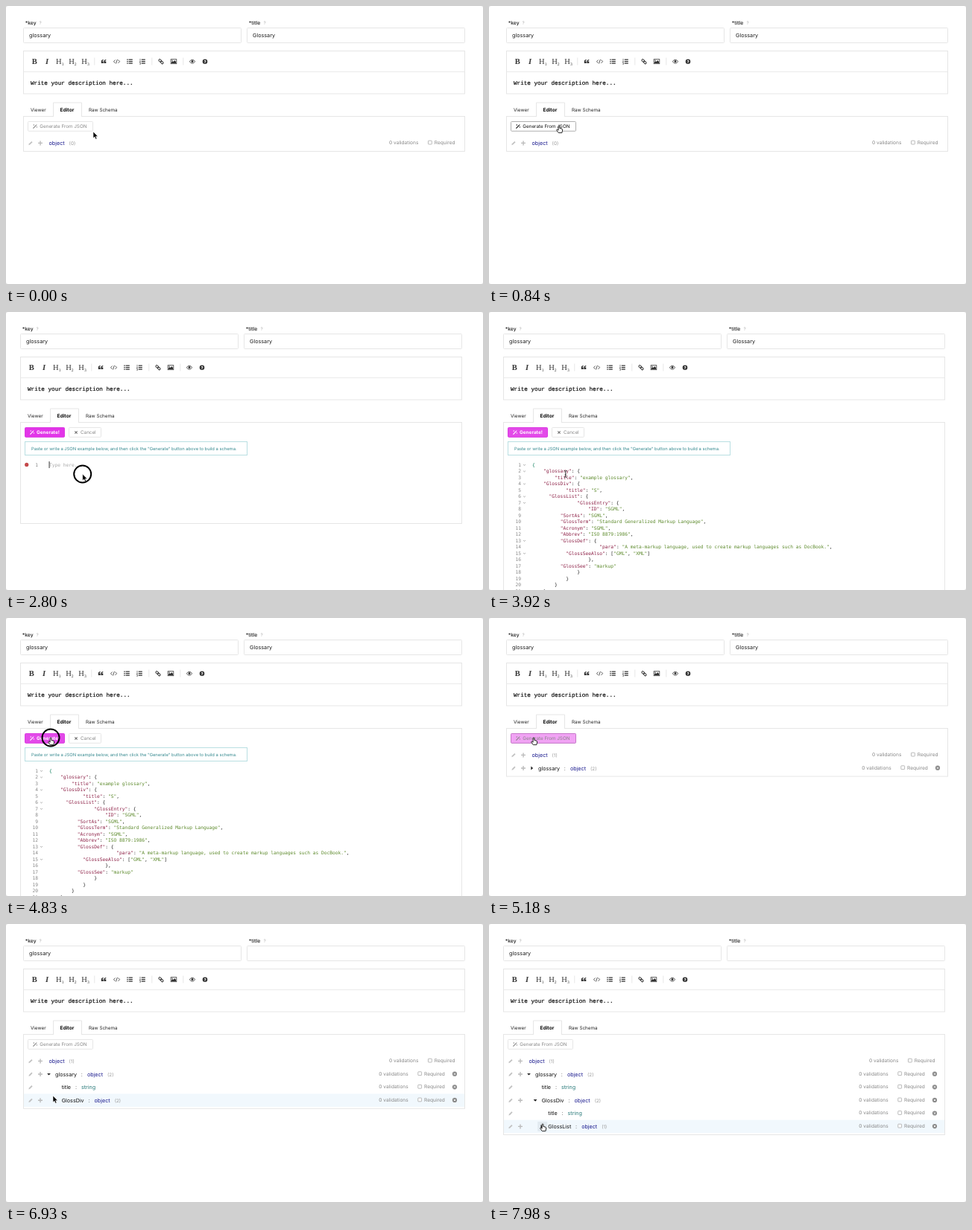
These frames come from a looping animation (640x374 px, 8 s). An HTML page:

```html
<!DOCTYPE html>
<html lang="en">
<head>
<meta charset="utf-8">
<title>Schema editor</title>
<style>
html, body { margin: 0; width: 100%; height: 100%; overflow: hidden; background: #ddd; }
svg { display: block; width: 100%; height: 100%; font-family: Inter, Roboto, sans-serif; text-rendering: geometricPrecision; }
.code { font-family: "DejaVu Sans Mono", monospace; }
.serif { font-family: "Liberation Serif", "Noto Serif", serif; }
.courier { font-family: "Liberation Mono", monospace; }
</style>
</head>
<body>
<svg id="stage" viewBox="0 0 640 374"></svg>
<script>
const stage = document.getElementById('stage');
const LOOP = 8000, STEP = 70, ROW = 17.6, INDENT = 8.6;
const OPEN = 1890, PASTE = 3080, DONE = 5040, EXPAND = 6160, EXPAND2 = 7210;
const PINK = '#e235e8', BORDER = '#e6e6e6';

// Text with its capitals centred on y
const text = (x, y, s, size = 7.2, fill = '#1a1a1a', extra = '') =>
  `<text x="${x}" y="${y + size * .36}" font-size="${size}" fill="${fill}" ${extra}>${s}</text>`;
const rect = (x, y, w, h, fill = 'none', line = 'none', extra = '') =>
  `<rect x="${x}" y="${y}" width="${w}" height="${h}" fill="${fill}" stroke="${line}" ${extra}/>`;
const path = (x, y, d, fill = 'none', line = 'none', width = 1) =>
  `<path transform="translate(${x} ${y})" d="${d}" fill="${fill}" stroke="${line}" stroke-width="${width}"/>`;
const circle = (x, y, r, fill, line = 'none', width = 1) =>
  `<circle cx="${x}" cy="${y}" r="${r}" fill="${fill}" stroke="${line}" stroke-width="${width}"/>`;
const button = (x, w, fill, line, extra = '') => rect(x, 155.5, w, 12.8, fill, line, 'rx="1" ' + extra);

// Pointer path: time, x, y
const route = [
  [0, 117, 169], [490, 94, 161], [1960, 94, 161], [2450, 102, 212], [2520, 102, 212],
  [2660, 102.7, 218], [3920, 102.7, 218], [4620, 60, 161], [5670, 60, 161], [6090, 57, 200],
  [6510, 57, 200], [6580, 58, 203], [6720, 58, 203], [6930, 63, 231], [7070, 66, 234],
  [7560, 66, 234], [7980, 72, 269]
];
const clicks = [1820, 2800, 4830, 6090, 7140];

const json = [
  [0, '{'], [4, '"glossary": {'], [8, '"title": "example glossary",'], [4, '"GlossDiv": {'],
  [12, '"title": "S",'], [6, '"GlossList": {'], [16, '"GlossEntry": {'], [20, '"ID": "SGML",'],
  [10, '"SortAs": "SGML",'], [10, '"GlossTerm": "Standard Generalized Markup Language",'],
  [10, '"Acronym": "SGML",'], [10, '"Abbrev": "ISO 8879:1986",'], [10, '"GlossDef": {'],
  [24, '"para": "A meta-markup language, used to create markup languages such as DocBook.",'],
  [12, '"GlossSeeAlso": ["GML", "XML"]'], [20, '},'], [10, '"GlossSee": "markup"'],
  [16, '}'], [12, '}'], [8, '}'], [4, '}']
];

// Schema rows: depth, name, child count (none for strings)
const schema = [[0, '', 0], [1, 'glossary', 2], [2, 'title'], [2, 'GlossDiv', 2], [3, 'title'], [3, 'GlossList', 1]];

const rowY = i => 184.4 + i * ROW;
const arrowX = depth => 57.5 + (depth - 1) * INDENT;

function pointer(t) {
  let i = 1;
  while (i < route.length - 1 && t > route[i][0]) i++;
  const [t0, x0, y0] = route[i - 1], [t1, x1, y1] = route[i];
  const p = Math.min(1, (t - t0) / (t1 - t0)), k = p * p * (3 - 2 * p);
  return [x0 + (x1 - x0) * k, y0 + (y1 - y0) * k];
}

function toolbar() {
  const ink = '#333', y = 74.7;
  let s = text(38.3, y, 'B', 10.5, ink, 'class="serif" font-weight="700" text-anchor="middle"') +
    text(55, y, 'I', 10.5, ink, 'class="serif" font-weight="700" font-style="italic" text-anchor="middle"');
  [1, 2, 3].forEach(n => s += text(50 + n * 17.1, y, `H<tspan font-size="5.6" dy="1.2">${n}</tspan>`, 10.5, ink, 'class="serif"'));
  [118.5, 195.5, 237.5].forEach(x => s += rect(x, 69.5, .7, 10, '#ddd'));
  [127.8, 131.4].forEach(x => s += path(x, y, 'M0 2.4V-.3Q0-2.7 2.9-2.8V-1.6Q1.5-1.4 1.5-.3H2.9V2.4Z', ink));
  s += path(148.5, y, 'M-2-2.2L-4 0L-2 2.2M2-2.2L4 0L2 2.2M.8-2.8L-.8 2.8', 'none', ink, .8);
  s += path(166, y, 'M-1.4-2.5H3.8M-1.4 0H3.8M-1.4 2.5H3.8M-3.8-2.5h1.5M-3.8 0h1.5M-3.8 2.5h1.5', 'none', ink, 1.3);
  s += path(183, y, 'M-1.2-2.5H3.8M-1.2 0H3.8M-1.2 2.5H3.8', 'none', ink, 1.2) +
    path(183, y, 'M-3-3.8v2.2M-3.8-.7h1.3L-3.7.9h1.3M-3.8 2h1.3v1.6h-1.3', 'none', ink, .6);
  s += `<g transform="rotate(45 208 ${y})">` + rect(204.2, y - 1.3, 4.2, 2.6, 'none', ink, 'rx="1.3"') +
    rect(207.6, y - 1.3, 4.2, 2.6, 'none', ink, 'rx="1.3"') + '</g>';
  s += rect(221.2, y - 3, 7.6, 6, 'none', ink, 'stroke-width=".8"') +
    path(225, y, 'M-3 2.2V.8L-1.5-.6L-.5.4L1.4-1.6L3 .2V2.2Z', ink) + circle(223.1, y - 1.4, .7, ink);
  s += path(250, y, 'M-3.8 0Q0-5 3.8 0Q0 5-3.8 0Z', 'none', ink, .8) + circle(250, y - .2, 1.5, ink);
  return s + circle(267, y, 3.3, ink) + text(267, y, '?', 5.4, '#fff', 'font-weight="800" text-anchor="middle"');
}

const wand = (x, color) =>
  path(x, 162, 'M-2.6 2.6L1.8-1.8', 'none', color, 1.2) +
  path(x, 162, 'M-1.7-2.8v1.6M-2.5-2h1.6M2.4.2v1.4M1.7.9h1.4M2-2.8v.8', 'none', color, .6);

function form(t) {
  let s = '';
  [[23.5, '*key', 'glossary', 46], [323.5, '*title', t < EXPAND ? 'Glossary' : '', 347]].forEach(([x, label, value, help]) => {
    s += text(x + 2.3, 23, label, 6.7, '#1a1a1a', 'font-weight="500"') +
      text(help, 23, '?', 6.2, '#aaa', 'text-anchor="middle"') +
      rect(x, 29.5, 292, 20, '#fff', BORDER, 'rx="1"') + text(x + 7.6, 39.6, value);
  });
  const blink = t >= 280 && t < 840 || t >= 1400 && t < 1680;
  if (blink) s += rect(361.8, 35, .8, 9, '#333');
  s += rect(23.5, 60.5, 592, 57.5, '#fff', BORDER) + rect(24, 88, 591, 1, '#eaeaea') + toolbar();
  return s + text(33, 103.6, 'Write your description here...', 7.65, '#000', 'class="courier" stroke="#000" stroke-width=".15"');
}

function tabs(bottom) {
  return rect(23.5, 148.5, 592, bottom - 148.5, '#fff', BORDER) +
    path(0, 0, 'M63.5 149V130H101.5V149', '#fff', BORDER) + rect(64, 147.5, 37, 2, '#fff') +
    text(33, 140, 'Viewer', 6.3, '#222') +
    text(72.4, 140, 'Editor', 6.6, '#111', 'font-weight="700"') +
    text(111, 140, 'Raw Schema', 6.3, '#222');
}

function codePanel(t, hover) {
  const mono = 'class="code"';
  let s = button(29.5, 53, hover || t >= PASTE ? '#e34ae9' : PINK, '#dc3be2') +
    wand(39, '#fff') + text(45, 162, 'Generate!', 6.4, '#fff', 'font-weight="700"') +
    button(88.5, 43, '#fff', BORDER) +
    path(98, 162, 'M-1.7-1.7L1.7 1.7M1.7-1.7L-1.7 1.7', 'none', '#777', 1.2) +
    text(104, 162, 'Cancel', 6.3, '#888') +
    rect(29.5, 174.5, 298, 18, '#fff', '#b9dfe2') +
    text(38, 183.8, 'Paste or write a JSON example below, and then click the "Generate" button above to build a schema.', 5.8, '#35898f');
  if (t < PASTE) {
    return s + circle(31.7, 205.4, 2.6, '#c4494b') + text(47, 205.4, '1', 6.25, '#888', mono + ' text-anchor="end"') +
      text(62, 205.4, 'Type here...', 6.25, '#aaa', mono) + rect(61.6, 201, .9, 9, '#222');
  }
  json.forEach(([indent, line], i) => {
    const y = 205.4 + i * 8.5;
    const colored = line.replace(/("[^"]+")(:?)/g, (m, str, colon) =>
      `<tspan fill="${colon ? '#8c1f45' : '#5d8a2c'}">${str}</tspan>${colon}`);
    s += text(47, y, i + 1, 6.25, '#888', mono + ' text-anchor="end"') +
      text(62 + indent * 3.7625, y, colored, 6.25, i ? '#222' : '#075', mono);
    if (/[{[]/.test(line)) s += path(51.5, y, 'M-1.4-.2L0 1L1.4-.2', 'none', '#888', .7);
  });
  return s;
}

function row(i, open, hot, hotArrow) {
  const [depth, name, count] = schema[i], y = rowY(i), isObject = count !== undefined;
  const kids = i ? count : open > 1 ? 1 : 0;
  const dx = i ? -13.7 : 0, x = arrowX(depth);
  let s = hot ? rect(24, y - 8.8, 591, ROW, '#f1f8fd') : '';
  s += path(33, y, 'M-2.6 2.8L-2.1.9L1.3-2.5L2.6-1.2L-.8 2.2Z', '#c2c2c2');
  if (isObject) s += path(46, y, 'M-3 0H3M0-3V3', 'none', '#bbb', 1.4);
  if (hotArrow) s += rect(x - 5.5, y - 6.5, 13, 13, '#e2eaf0');
  if (isObject && i) {
    const expanded = i === 1 && open > 2 || i === 3 && open > 4;
    s += path(x, y, expanded ? 'M-2.4-1.1H2.4L0 1.6Z' : 'M-1.2-2.4L1.6 0L-1.2 2.4Z', '#222');
  }
  const type = isObject ? 'object' : 'string';
  const part = (str, gap, fill, extra = '') => `<tspan dx="${gap}" fill="${fill}" ${extra}>${str}</tspan>`;
  s += text(i ? x + 8.6 : 57.5, y,
    (i ? name + part(':', 5.8, '#222') : '') +
    part(type, i ? 6 : 0, isObject ? '#16168c' : '#2a7a7a') +
    (isObject ? part(`(${kids})`, 6, '#999', 'font-size="6.3"') : ''), 7.2, '#111');
  s += text(514 + dx, y - .7, '0 validations', 6.6, '#888') +
    rect(566.5 + dx, y - 3.2, 4.8, 4.8, '#fff', '#aaa', 'stroke-width=".8" rx=".6"') +
    text(574.8 + dx, y - .7, 'Required', 6.6, '#888');
  if (i) s += circle(602, y - .3, 3.1, '#8a8a8a') + path(602, y - .3, 'M-1.1-1.1L1.1 1.1M1.1-1.1L-1.1 1.1', 'none', '#fff', .9);
  return s;
}

function schemaPanel(t, open, hover, hotRow, hotArrow) {
  const fade = t >= DONE ? Math.max(0, 1 - (t - DONE) / 280) : 0;
  const ink = hover && !fade ? '#111' : '#888';
  let s = button(29.5, 87, '#fff', hover ? '#b0b0b0' : BORDER);
  if (fade) s += button(29.5, 87, PINK, PINK, `opacity="${fade * .9}"`);
  s += wand(39, ink) + text(45.3, 162, 'Generate From JSON', 6.3, ink);
  for (let i = 0; i < open; i++) s += row(i, open, i === hotRow, i === hotArrow);
  return s;
}

function cursor(x, y, kind) {
  if (kind === 'hand')
    return path(x, y, 'M-.9.5Q0-.8.9.5V3.4L4 4.3Q4.8 4.7 4.6 6L3.9 9.6H-.7L-3.2 6.2Q-3.4 4.9-2.3 5.1L-.9 6.2Z', '#fff', '#111', .9);
  if (kind === 'beam')
    return path(x, y, 'M-1.6-4.5Q0-4.5 0-3.4Q0-4.5 1.6-4.5M0-3.4V3.4M-1.6 4.5Q0 4.5 0 3.4Q0 4.5 1.6 4.5M-1 1H1', 'none', '#222', .9);
  return path(x, y, 'M0 0V8.8L2 7L3.4 10.2L5 9.5L3.6 6.4H6.3Z', '#000', '#fff', .6);
}

function draw(t) {
  const coding = t >= OPEN && t < DONE;
  const shift = coding || t >= EXPAND2 ? -4 : 0;
  const open = t >= EXPAND2 ? 6 : t >= EXPAND ? 4 : t >= DONE ? 2 : 1;
  const [x, y] = pointer(t), px = x - shift;
  const hover = px > 29 && px < (coding ? 83 : 116) && y > 155 && y < 168;
  const hotRow = coding ? -1 : Math.floor((y - 175.6) / ROW);
  const hotArrow = coding ? -1 : schema.findIndex(([depth, , count], i) => i && i < open && count &&
    Math.abs(px - arrowX(depth)) < 3 && Math.abs(y - rowY(i)) < 4);
  const bottom = coding ? (t < PASTE ? 284.5 : 390) : 195.5 + (open - 1) * ROW;
  const kind = hover || hotArrow > 0 ? 'hand' : coding && t >= PASTE && y > 196 ? 'beam' : 'arrow';
  const ring = clicks.some(c => t >= c && t < c + STEP);
  stage.innerHTML = rect(0, 0, 640, 374, '#fff', 'none', 'rx="3"') +
    `<g transform="translate(${shift} 0)">` + form(t) + tabs(bottom) +
    (coding ? codePanel(t, hover) : schemaPanel(t, open, hover, hotRow, hotArrow)) + '</g>' +
    cursor(x, y, kind) + (ring ? circle(x, y, 11.5, 'none', '#000', 2) : '');
}

let shown = -1;
function tick(now) {
  const t = Math.floor(now % LOOP / STEP) * STEP;
  if (t !== shown) draw(shown = t);
  requestAnimationFrame(tick);
}
draw(0);
requestAnimationFrame(tick);
</script>
</body>
</html>
```
